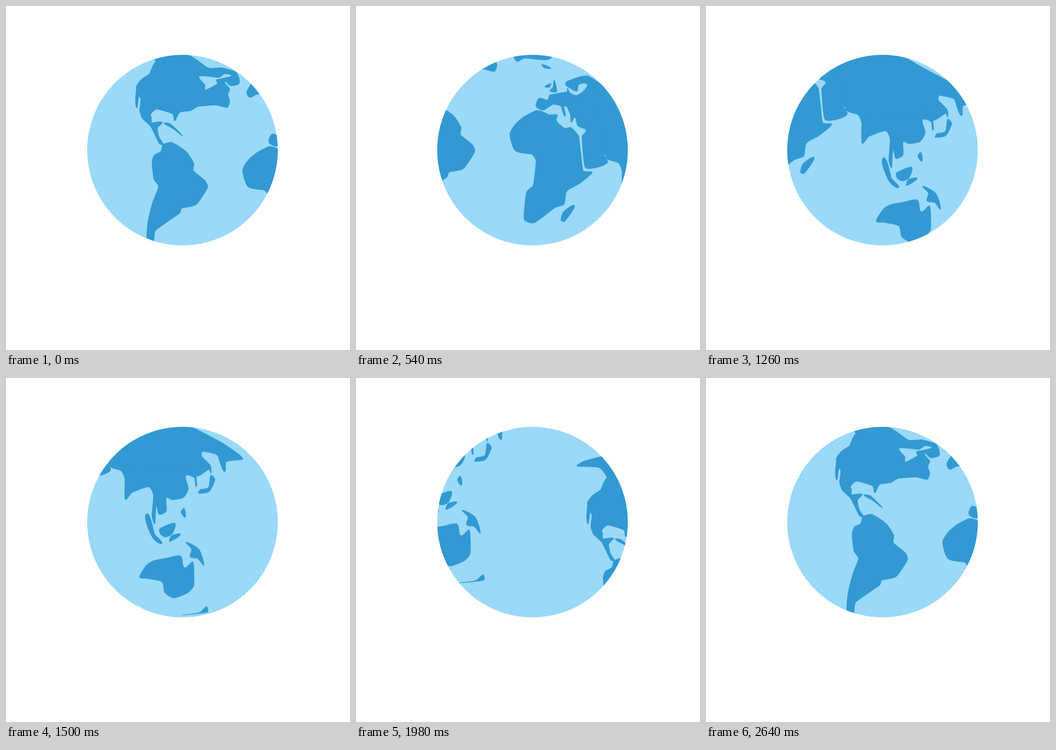
An HTML page for the animation above (2.67 s loop, 748 by 748 pixels).

```html
<!DOCTYPE html>
<html lang="en">
<head>
<meta charset="utf-8">
<title>Turning globe</title>
<style>
  html, body { margin: 0; width: 100%; height: 100%; overflow: hidden; background: #fff; }
  svg { display: block; width: 100%; height: 100%; }
  .sea { fill: #9ad9f8; }
  .land { fill: #3299d2; }
  .spin { animation: spin 2670ms steps(89) infinite; }
  /* the second map lies 88 steps away, so the last step shows the first view again */
  @keyframes spin { to { transform: translate(-890px, -387.15px); } }
</style>
</head>
<body>
<svg viewBox="0 0 748 748">
  <defs>
    <clipPath id="disc"><circle cx="383.8" cy="313.4" r="207.2"/></clipPath>
    <g id="map"></g>
  </defs>
  <g clip-path="url(#disc)">
    <rect class="sea" width="748" height="748"/>
    <g class="spin">
      <use href="#map"/>
      <use href="#map" x="880" y="382.8"/>
    </g>
  </g>
</svg>
<script>
  const map = document.getElementById('map');

  // closed smooth curve; handles follow the neighbours and never exceed the shorter side
  function smooth(flat) {
    const pts = [];
    for (let i = 0; i < flat.length; i += 2) pts.push([flat[i], flat[i + 1]]);
    const n = pts.length, at = i => pts[(i + n) % n];
    const dist = (a, b) => Math.hypot(a[0] - b[0], a[1] - b[1]);
    const handle = (i, side) => {
      const a = at(i - 1), p = at(i), b = at(i + 1);
      const s = side * 0.25 * Math.min(dist(a, p), dist(p, b)) / dist(a, b);
      return [p[0] + s * (b[0] - a[0]), p[1] + s * (b[1] - a[1])];
    };
    return 'M' + pts[0] + pts.map((p, i) =>
      'C' + [handle(i, 1), handle(i + 1, -1), at(i + 1)].join(' ')).join('') + 'Z';
  }

  // points are given as seen when the globe has turned by the given steps
  function shape(kind, step, pts) {
    const path = document.createElementNS('http://www.w3.org/2000/svg', 'path');
    path.setAttribute('class', kind);
    path.setAttribute('d', smooth(pts));
    path.setAttribute('transform', `translate(${step * 10} ${step * 4.35})`);
    map.append(path);
  }
  const land = (step, ...pts) => shape('land', step, pts);
  const sea = (step, ...pts) => shape('sea', step, pts);

  // Alaska
  land(-13, 390,153, 404,142, 440,132, 461,135, 491,150, 530,165, 560,215, 440,240,
    413,236, 424,216, 446,200, 455,178, 438,156);
  // North America
  land(0, 390,104, 440,134, 470,134, 501,144, 508,168, 488,174, 476,165, 487,180,
    483,193, 487,207, 481,221, 456,216, 418,219, 402,228, 378,232, 367,250, 362,235,
    328,225, 315,236, 316,252, 298,246, 290,228, 291,198, 285,222, 281,206, 283,181,
    290,164, 310,150, 325,122);
  // Hudson Bay
  sea(0, 421,153, 463,156, 476,148, 490,152, 457,160, 459,169, 434,182, 433,171);
  // Central America, Cuba
  land(0, 294,240, 316,240, 316,253, 340,252, 330,266, 334,286, 343,301, 333,300, 314,262);
  land(0, 343,255, 358,256, 384,282, 364,268);
  // South America
  land(0, 341,301, 361,296, 392,316, 409,342, 408,358, 433,379, 439,395, 414,432,
    383,440, 378,451, 326,488, 321,514, 306,508, 308,470, 318,428, 331,393, 321,376,
    317,340, 322,324, 336,316);
  // Greenland, Iceland, Ireland, Britain
  land(18, 343,108, 350,121, 367,114, 417,117, 440,92, 365,80);
  land(18, 404,126, 424,135, 409,135);
  land(18, 410,175, 424,168, 421,177);
  land(18, 431,161, 437,186, 421,185, 428,176);
  // Africa, Madagascar
  land(18, 391,227, 364,241, 345,258, 334,279, 346,315, 382,323, 391,338, 385,389,
    370,405, 365,464, 388,472, 433,439, 453,431, 459,403, 487,386, 514,362, 494,357,
    485,284, 468,264, 453,265, 436,249, 438,236, 421,236, 405,229);
  land(18, 476,434, 454,469, 445,466, 451,447);
  // Europe
  land(18, 391,218, 398,200, 416,204, 421,193, 458,186, 460,178, 465,188, 480,194,
    495,184, 502,170, 485,171, 480,186, 457,174, 457,164, 488,153, 506,152, 543,181,
    560,270, 475,205, 430,214, 407,227);
  // Italy to Arabia
  land(18, 430,205, 430,214, 445,218, 455,240, 454,218, 465,235, 468,253, 476,243,
    482,261, 500,270, 491,284, 498,351, 530,350, 548,338, 527,305, 539,322, 560,332, 560,200);
  // India to Korea
  land(42, 304,226, 330,237, 338,255, 339,299, 355,284, 390,272, 400,290, 397,335,
    404,352, 407,315, 413,332, 429,324, 429,296, 441,300, 466,295, 477,275, 471,248,
    489,252, 494,271, 494,249, 500,225, 310,195);
  // Siberia
  land(42, 494,249, 521,234, 526,243, 525,225, 506,205, 508,195, 538,202, 546,222,
    556,239, 560,217, 595,212, 585,199, 553,177, 522,160, 478,137, 432,111, 383,89,
    324,83, 291,68, 312,226, 470,230);
  // Japan, Philippines, Sumatra, Borneo, Sulawesi, New Guinea
  land(42, 525,246, 535,256, 522,282, 498,286, 502,277, 520,272);
  land(42, 468,318, 470,338, 460,326);
  land(42, 385,330, 404,374, 419,395, 397,380);
  land(42, 414,362, 447,350, 442,374, 427,381, 415,374);
  land(42, 440,377, 460,375, 436,391);
  land(42, 471,391, 500,407, 511,442, 497,428, 480,424, 483,407);
  // Australia, New Zealand
  land(58, 210,398, 225,372, 241,362, 271,356, 300,352, 308,377, 327,365, 329,416,
    315,433, 285,444, 265,432, 259,409, 229,402);
  land(58, 302,481, 340,475, 356,462, 358,475);
</script>
</body>
</html>
```
